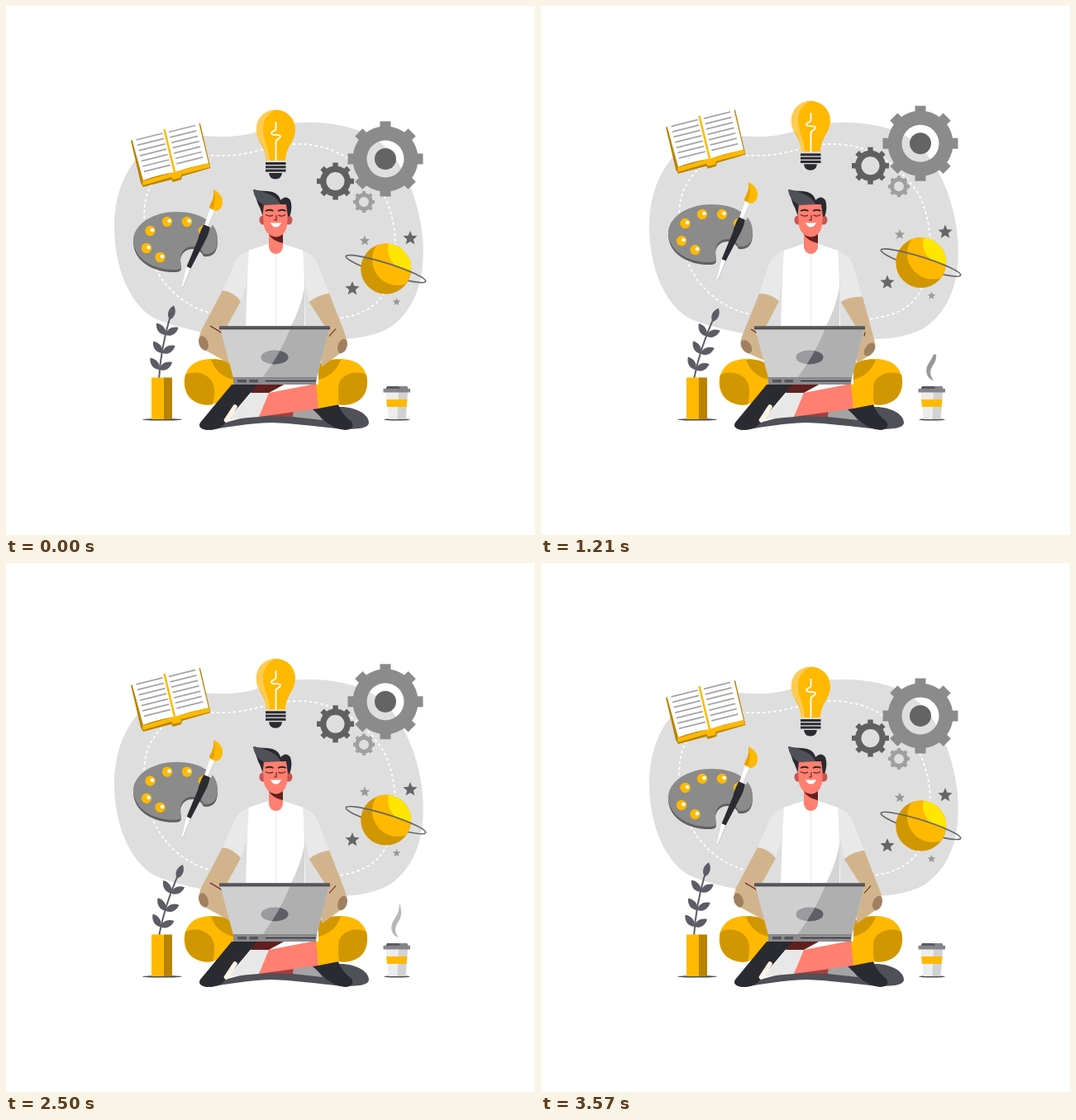
An HTML page with a canvas that plays this animation: 640x640 px, repeating every 3640 ms.

```html
<!DOCTYPE html>
<html lang="en">
<head>
<meta charset="utf-8">
<title>Creative work</title>
<style>
html, body { margin: 0; width: 100%; height: 100%; overflow: hidden; background: #fff; }
canvas { display: block; width: 640px; height: 640px; }
</style>
</head>
<body>
<canvas id="stage" width="640" height="640"></canvas>
<script>
const ctx = document.getElementById('stage').getContext('2d');
const LOOP = 3640, HALF = LOOP / 2, TAU = Math.PI * 2;
const GOLD = '#ffb900', OCHRE = '#d19700', INK = '#2a2a31', SLATE = '#505058',
      SKIN = '#ff7f70', MAROON = '#60201f', TAN = '#d2b48c';

const lerp = (a, b, k) => a + (b - a) * k;
const clamp = v => Math.max(0, Math.min(1, v));
const cubic = k => k < .5 ? 4 * k ** 3 : 1 - 4 * (1 - k) ** 3;

function fill(color, d) {
  ctx.fillStyle = color;
  ctx.fill(new Path2D(d));
}
function line(color, width, d) {
  ctx.strokeStyle = color;
  ctx.lineWidth = width;
  ctx.stroke(new Path2D(d));
}
function oval(color, x, y, rx, ry = rx, turn = 0) {
  ctx.fillStyle = color;
  ctx.beginPath();
  ctx.ellipse(x, y, rx, ry, turn, 0, TAU);
  ctx.fill();
}
function shifted(dy, draw) {
  ctx.save();
  ctx.translate(0, dy);
  draw();
  ctx.restore();
}
function flipped(draw) {
  ctx.save();
  ctx.translate(653, 0);
  ctx.scale(-1, 1);
  draw();
  ctx.restore();
}

function backdrop() {
  fill('#dedede', 'M240 157C272 160 292 157 312 149C350 136 405 138 441 157C474 175 496 222 503 270C510 326 497 367 463 390C430 407 395 403 360 401L272 401C238 395 205 389 180 378C150 362 131 316 131 268C131 222 151 168 205 158Q222 156 240 157Z');
  ctx.setLineDash([3.5, 3.2]);
  line('#fff', 1.8, 'M264 375C222 370 188 341 176 306C165 272 162 232 180 210C201 177 236 181 262 181C300 181 320 167 350 167C400 166 435 194 457 228C476 266 474 312 459 345C446 369 420 377 392 379');
  ctx.setLineDash([]);
}

function gear(color, x, y, tip, body, halfTooth, hole) {
  const baseAngle = Math.asin(halfTooth / body);
  const reach = Math.hypot(tip, halfTooth), tipAngle = Math.atan2(halfTooth, tip);
  ctx.beginPath();
  for (let i = 0; i < 8; i++) {
    const a = i * TAU / 8;
    for (const s of [-1, 1])
      ctx.lineTo(x + reach * Math.cos(a + s * tipAngle), y + reach * Math.sin(a + s * tipAngle));
    ctx.arc(x, y, body, a + baseAngle, a + TAU / 8 - baseAngle);
  }
  ctx.closePath();
  ctx.moveTo(x + hole, y);
  ctx.arc(x, y, hole, 0, TAU);
  ctx.fillStyle = color;
  ctx.fill('evenodd');
}
function gears() {
  gear('#9f9f9f', 433, 237, 13, 10.8, 2.1, 6);
  gear('#606060', 398.5, 212, 22.5, 18.5, 3.2, 11);
  gear('#8b8b8b', 459, 185, 45.5, 39.5, 6.5, 22.5);
  oval('#646464', 459, 185, 13);
}

function book() {
  fill('#b88300', 'M151 163L155 161L168 209L244 190L232 143L235 142L247.5 196L213 206L212 210L202 213L200 210L166 219L163 214Z');
  fill(GOLD, 'M165 212L203 201L245 190L247 195L212 204L211 208L202 210L200 207L166 217Z');
  fill('#fff', 'M152.5 161.5Q172 153 191 150Q211 142 233 140L245 190Q224 194 204 201Q184 204 166 211Z');
  line(GOLD, 2.5, 'M191.5 149L204 201');
  for (let i = 0; i < 7; i++) {
    const x = i * 1.55, y = i * 6.4;
    line('#a5a5a5', 1.8, `M${157.5 + x} ${162 + y}l32 -8M${197 + x} ${152.5 + y}l32 -8`);
  }
}

function star(color, x, y, r) {
  ctx.beginPath();
  for (let i = 0; i < 10; i++) {
    const a = i * TAU / 10 - TAU / 4, q = i % 2 ? r * .45 : r;
    ctx.lineTo(x + q * Math.cos(a), y + q * Math.sin(a));
  }
  ctx.fillStyle = color;
  ctx.fill();
}
function orbit(from, to) {
  ctx.strokeStyle = '#666';
  ctx.lineWidth = 1.7;
  ctx.beginPath();
  ctx.ellipse(459.5, 318, 50.5, 7, .305, from, to);
  ctx.stroke();
}
function planet() {
  star('#666', 489, 281, 9);
  star('#999', 434, 284, 6.5);
  star('#666', 419, 342, 9);
  star('#999', 472.5, 358, 5);
  orbit(0, Math.PI);
  ctx.save();
  ctx.beginPath();
  ctx.arc(459.7, 318, 30.5, 0, TAU);
  ctx.clip();
  oval(OCHRE, 459.7, 318, 32);
  oval(GOLD, 474, 307, 31);
  oval('#ffe600', 488, 294, 26);
  ctx.restore();
  orbit(Math.PI, TAU);
}

function palette() {
  const board = 'M256 281C256 297 249 301 239 300C234 287 213 288 211 304C211 314 215 318 206 319C180 320 154 307 154 282C156 262 180 249 206 249C235 249 256 262 256 281Z';
  shifted(3, () => fill('#606060', board));
  fill('#8b8b8b', board);
  for (const [x, y] of [[174.5, 272], [195, 261], [219, 261], [170, 293], [186.5, 304], [239, 272]]) {
    oval(GOLD, x, y, 6.2);
    oval('#fff', x + 2.5, y - 1, 2.3);
  }
  fill('#fff', 'M247 245L256 249L248 268L240 265Z');
  fill('#dcdcdc', 'M252 247L256 249L248 268L244 266Z');
  fill(INK, 'M239.5 264.5L246.5 267.5Q246 275 241 284L223.5 317.5L218.5 315.5L232 283Q235 271 239.5 264.5Z');
  fill('#fff', 'M218.5 315L223.5 317.5L214 341L212.5 340Z');
  line('#b5b5b5', .7, 'M223.5 317.5L214 341L212.5 340');
  fill(GOLD, 'M251 222C259 226 263 232 262 239C261 245 257 248 253 248L246 244C248 236 253 235 251 222Z');
  fill('#ec9f00', 'M251 222C254 233 253 239 250 246L246 244C248 236 252 235 251 222Z');
}

function bulb() {
  fill(GOLD, 'M303 149A23.5 23.5 0 0 1 350 149C350 165 339 168 338 187L315 187C314 168 303 165 303 149Z');
  fill('#ffcb52', 'M326 126C303 126 298 152 307 163C313 169 314 178 315 187H319C319 171 311 164 311 149C311 137 318 129 326 126Z');
  line('#fff', 1.9, 'M326.5 140V149C326 152 321 151 321 154C322 158 332 154 332 158C331 162 326 160 326.5 165V187');
  for (const y of [189, 193.3, 197.6]) fill(INK, `M314 ${y}H338.5V${y + 3}H314Z`);
  fill(INK, 'M318 202H334Q333 209.5 326 209.5Q319 209.5 318 202Z');
}

function knee() {
  fill(GOLD, 'M275 434C262 425 240 425 228 432C212 442 212 467 226 477C236 484 246 484 253 481C262 478 270 466 275 457Z');
  fill(OCHRE, 'M217 446C232 439 252 447 252 465Q252 476 250 482C238 484 226 479 221 472C216 465 215 455 217 446Z');
  fill(OCHRE, 'M248 428Q262 426 275 434V452Q255 447 248 428Z');
}
function legs() {
  fill(SLATE, 'M246 511C275 499 310 492 345 491L405 485C423 485 439 494 439 504C439 511 425 512 406 512C373 508 347 505 321 504C292 505 270 509 246 513Z');
  fill('#a4a4a4', 'M344 492L372 486L383 501L347 497Z');
  fill('#a33f3f', 'M310 496L348 488L347 497Z');
  fill(INK, 'M370 487L402 482Q406 494 418 503Q423 512 410 513Q399 512 388 504Z');
  knee();
  flipped(knee);
  fill(GOLD, 'M373 458L403 455Q401 467 403 482L378 487Z');
  fill(MAROON, 'M294 457H338L318 468L297 470Z');
  fill('#e8e8e8', 'M297 468L318 468L306 497L270 500Z');
  fill(SKIN, 'M318 468L375 457L378 487L306 497Z');
  fill(INK, 'M273 458H304L262 508Q256 513 243 513Q231 511 235 504Z');
  ctx.lineCap = 'round';
  line('#fff4e6', 5.5, 'M266.5 501L277 485');
  ctx.lineCap = 'butt';
}

function torso() {
  fill('#fff', 'M293 296L317 288H336L360 296L362 390H290Z');
  line('#ececec', 1, 'M326.5 298V388');
  fill('#d4d4d4', 'M361 341V389H344Q356 367 361 341Z');
}

function head() {
  fill(SKIN, 'M318 270H335V291A8.5 9 0 0 1 318 291Z');
  fill(MAROON, 'M318 274H335V287Q322 284 318 276Z');
  oval('#c95450', 311, 259, 4.5, 5.5);
  oval('#c95450', 342, 259, 4.5, 5.5);
  fill(SKIN, 'M310 239H342L340 266Q337 279 326 279.5Q315 278 312 266Z');
  fill(INK, 'M332 235Q339 228 344 235Q347 243 343.5 254L341 255L339 240H332Z');
  fill(INK, 'M299 222Q307 224 317 224Q329 225 332 234V240H312L310.5 254Q308 245 305 240Z');
  fill(SLATE, 'M299 222Q300 234 312 241L332 240Q327 227 299 222Z');
  line(INK, 1.8, 'M314 248Q319 245.5 323.5 248M329 248Q334 245.5 338.5 248');
  line(MAROON, 1.1, 'M314 252.5Q319 255.5 323 253M329.5 253Q334 255.5 338 252.5M327 253V259H324');
  fill('#fff', 'M320 262Q326.5 263 333 262Q331 267.5 326.5 267.5Q322 267.5 320 262Z');
}

// k bends the elbow; tuckX and tuckY set how much closer and lower it is held.
function arm(k, tuckX = 0, tuckY = 0) {
  const x = (a, b) => lerp(a, b, k) + tuckX;
  const y = (a, b) => lerp(a, b, k) + tuckY;
  const outer = `${lerp(262, 264, k)} ${y(344, 348)}`;
  const inner = `${lerp(284, 288, k) + tuckX / 3} ${357 + tuckY / 4}`;
  fill(TAN, `M${outer}L${x(236, 243)} ${y(393, 400)}Q${x(229, 238)} ${y(411, 414)} ${x(242, 250)} ${y(417, 420)}L271 ${y(433, 429)}L274 390H${x(260, 260)}L${lerp(267, 272, k)} 388L${inner}Q275 ${346 + tuckY} ${outer}Z`);
  oval('#a18060', x(239, 248.5), y(408, 412), 5.5, 9, lerp(-.35, -.6, k));
  line(MAROON, 1.1, `M${x(247, 254)} ${y(387, 391)}L262 ${y(396, 396)}`);
  fill('#e9e9e9', `M294 296Q280 301 276 312L${outer}Q${lerp(278, 280, k)} ${y(346, 348)} ${inner}L291 336Z`);
}

function laptop() {
  fill('#cfcfcf', 'M259 390H391L376 450H275Z');
  fill('#afafaf', 'M344 390H391L376 450H310Q332 421 344 390Z');
  fill('#6c6c71', 'M258 387H392V391.5H258Z');
  fill('#505056', 'M258 388.500H392V391H258Z');
  oval('#9a9a9f', 325, 425, 16.5, 8.5);
  ctx.save();
  ctx.clip(new Path2D('M344 390H391V450H310Q332 421 344 390Z'));
  oval('#5e5e66', 325, 425, 16.5, 8.5);
  ctx.restore();
  fill('#8a8a8e', 'M275 449H376L375 458H275Z');
  fill('#55555b', 'M280 452H291V455.5H280ZM294.500 452H305V455.5H294.5Z');
  line(INK, 1.3, 'M314 453.7H375');
}

function leaf(x, y, angle) {
  ctx.save();
  ctx.translate(x, y);
  ctx.rotate(angle);
  fill('#5c5c66', 'M0 0C-6 -5 -5 -13 0 -18C5 -13 6 -5 0 0Z');
  ctx.restore();
}
function plant(sway) {
  ctx.save();
  ctx.translate(185, 451);
  ctx.rotate(sway * .18);
  ctx.translate(-185, -451);
  line('#5c5c66', 2, 'M185 452Q187 415 199 374');
  leaf(198, 379.5, .28);
  for (const [x, y] of [[193, 398], [189, 420], [185.5, 440]]) {
    leaf(x, y, -.66);
    leaf(x, y, 1.04);
  }
  ctx.restore();
  oval('#4c4c4f', 189, 500.3, 24, 1.3);
  fill(GOLD, 'M176 449.500H191.5V500H176Z');
  fill('#b98200', 'M191 449.500H201V500H191Z');
}

function steam(t, wave) {
  const rising = t < HALF;
  ctx.save();
  ctx.beginPath();
  ctx.rect(455, rising ? 453 - 42 * wave : 411, 40, 60);
  ctx.clip();
  ctx.globalAlpha = rising ? 1 : wave;
  fill('#999', 'M476 411C480 424 478 429 474 435C470 442 470 446 475 453.500C465 449 465 440 468 434C472 427 476 424 476 411Z');
  ctx.restore();
}
function cup() {
  oval('#4c4c4f', 473, 500.3, 16, 1.3);
  fill('#ededed', 'M459.500 467H486L483.5 500H463Z');
  fill('#d2d2d2', 'M475 467H486L483.5 500H473.5Z');
  fill(GOLD, 'M460 476H485.5L484.5 485H461Z');
  fill('#5b5b61', 'M461 460H485L487 464H459Z');
  fill('#858589', 'M475 460H485L487 464H478Z');
  fill('#858589', 'M456.500 463H489V467.5H456.5Z');
}

function render(t) {
  const wave = (1 - Math.cos(t / LOOP * TAU)) / 2;
  const bend = cubic(clamp(t / 500)) - cubic(clamp((t - HALF) / 500));
  ctx.fillStyle = '#fff';
  ctx.fillRect(0, 0, 640, 640);
  backdrop();
  shifted(-25 * wave, gears);
  shifted(-21.8 * wave, book);
  shifted(-10 * wave, planet);
  shifted(-12 * wave, palette);
  shifted(-14.2 * wave, bulb);
  torso();
  head();
  legs();
  arm(bend);
  flipped(() => arm(bend, 7, 3.5));
  laptop();
  plant(wave);
  steam(t, wave);
  cup();
}

function tick(now) {
  render(now % LOOP);
  requestAnimationFrame(tick);
}
render(0);
requestAnimationFrame(tick);
</script>
</body>
</html>
```
